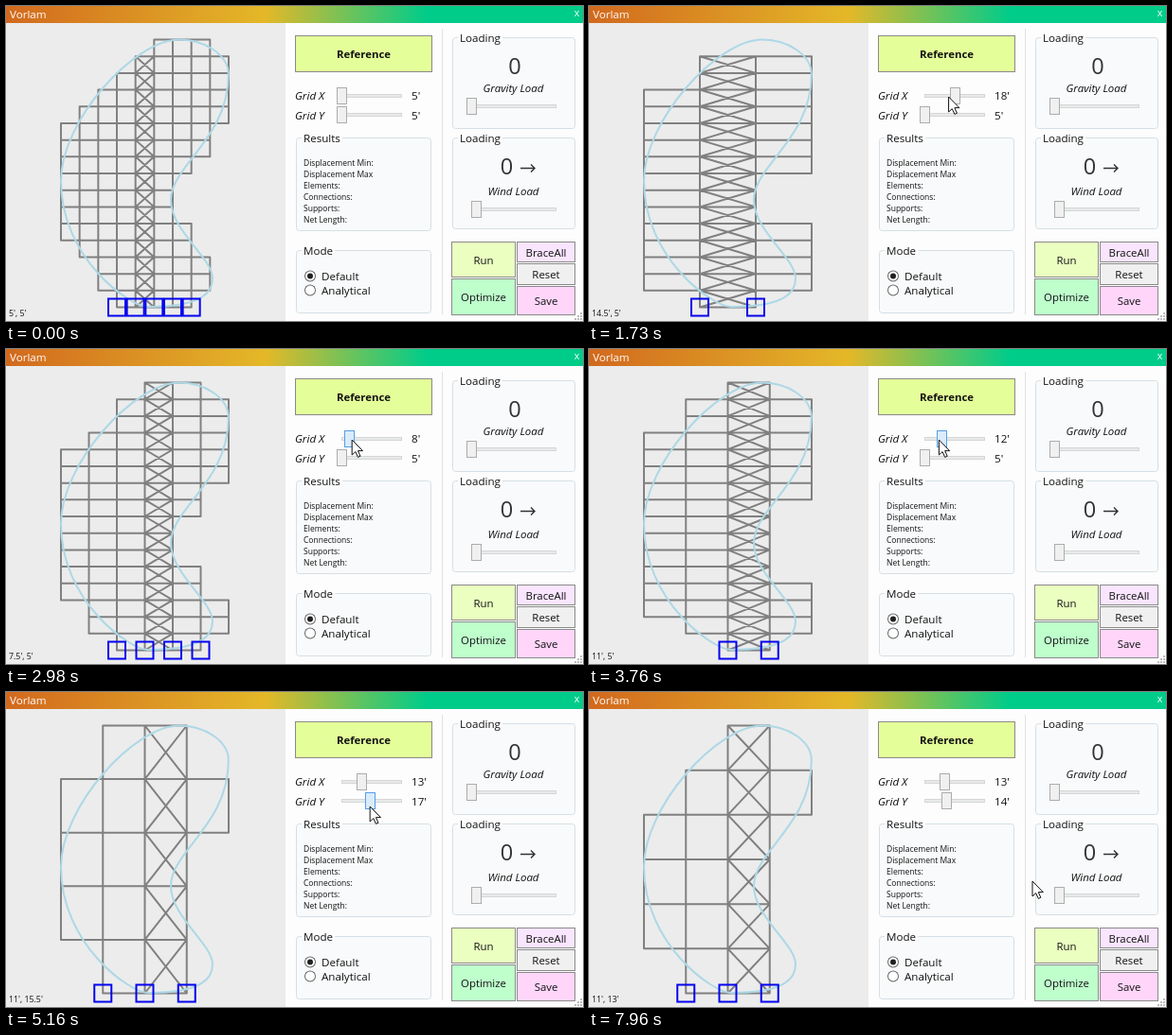
Animation, 609 px wide and 333 px high, one loop 8000 ms. Source, as an HTML page with a canvas:

```html
<!DOCTYPE html>
<html lang="en">
<head>
<meta charset="utf-8">
<title>Vorlam</title>
<style>
html, body { margin: 0; width: 100%; height: 100%; overflow: hidden; background: #fdfdfd; }
canvas { display: block; }
</style>
</head>
<body>
<canvas id="stage" width="609" height="333"></canvas>
<script>
const ctx = document.getElementById('stage').getContext('2d');
const LOOP = 8000;
const SANS = '"Open Sans", "Noto Sans", sans-serif';
const BOX = { x: 58, y: 35.5, w: 177, h: 283, feetX: 44, feetY: 78 };
const ROW_X = 95, ROW_Y = 115;

// Bean shape: one curve between each pair of extreme points.
const outline = new Path2D(`M58 185 C58 121 135.5 35.5 183 35.5 C210 35.5 234.8 52 234.8 72
  C234.8 141 174 168 174 205 C174 238 218 266 218 288 C218 301 210 318 150 318 C131 318 58 267 58 185Z`);

const mix = (a, b, k) => a + (b - a) * k;

function easeOut(t, start, end) {
  const u = Math.min(1, Math.max(0, (t - start) / (end - start)));
  return 1 - (1 - u) ** 2;
}

function gridX(t) {
  const up = mix(5, 20, easeOut(t, 1200, 2050));
  const down = mix(up, 7.4, easeOut(t, 2250, 3210));
  return mix(down, 13.4, easeOut(t, 3210, 4220));
}

function gridY(t) {
  return mix(mix(5, 20.5, easeOut(t, 4600, 5660)), 14.2, easeOut(t, 5660, 6490));
}

const thumbAt = feet => 354 + (feet - 5) * 2.5;

// The pointer comes in, drags X (trailing its thumb), drags Y, then leaves.
function pointer(t) {
  let x = 527, y = 308;
  const go = (toX, toY, start, end) => {
    const k = easeOut(t, start, end);
    x = mix(x, toX, k);
    y = mix(y, toY, k);
  };
  go(thumbAt(gridX(t - 160)), 96, 110, 950);
  go(thumbAt(gridY(t)), 121, 4220, 4520);
  go(468, 200, 7440, 7960);
  return { x, y };
}

function text(str, x, y, size = 11.6, { style = '', align = 'left', color = '#111' } = {}) {
  ctx.font = `${style} ${size}px ${SANS}`;
  ctx.textAlign = align;
  ctx.fillStyle = color;
  ctx.fillText(str, x, y);
}

function box(x, y, w, h, fill, stroke) {
  ctx.fillStyle = fill;
  ctx.fillRect(x, y, w, h);
  ctx.lineWidth = 1;
  ctx.strokeStyle = stroke;
  ctx.strokeRect(x + 0.5, y + 0.5, w - 1, h - 1);
}

function button(label, x, y, w, h, fill, style) {
  box(x, y, w, h, fill, '#8a8a8a');
  text(label, x + w / 2, y + h / 2 + 4.5, 11.4, { align: 'center', style });
}

function group(label, x, y, w, h) {
  ctx.beginPath();
  ctx.roundRect(x + 0.5, y + 0.5, w - 1, h - 1, 3);
  ctx.fillStyle = '#f9fafb';
  ctx.fill();
  ctx.lineWidth = 1;
  ctx.strokeStyle = '#d5dfe5';
  ctx.stroke();
  ctx.font = `11.6px ${SANS}`;
  ctx.fillStyle = '#fdfdfd';
  ctx.fillRect(x + 6, y - 2, ctx.measureText(label).width + 4, 5);
  text(label, x + 8, y + 4.5);
}

function slider(left, right, y, thumb, hot = false) {
  box(left, y - 2, right - left, 4, '#e7eaea', '#d6d6d6');
  box(Math.round(thumb) - 5, y - 9, 11, 18, hot ? '#daecfc' : '#f0f0f0', hot ? '#569de5' : '#acacac');
}

function disc(x, y, r, fill) {
  ctx.beginPath();
  ctx.arc(x, y, r, 0, 7);
  ctx.fillStyle = fill;
  ctx.fill();
}

function radio(label, y, on) {
  disc(321, y, 6, '#666');
  disc(321, y, 5, '#fff');
  if (on) disc(321, y, 3, '#212121');
  text(label, 333, y + 4);
}

function drawFrame(stepX, stepY) {
  const cols = Math.ceil(BOX.feetX / stepX), rows = Math.ceil(BOX.feetY / stepY);
  const px = c => BOX.x + BOX.w * c / cols, py = r => BOX.y + BOX.h * r / rows;
  const inside = (c, r) => ctx.isPointInPath(outline, px(c), py(r));
  const spine = Math.floor(cols / 2), feet = new Set();

  // A cell belongs to the frame when two or more of its corners lie within the outline.
  ctx.beginPath();
  for (let r = 0; r < rows; r++) {
    for (let c = 0; c < cols; c++) {
      const hits = inside(c, r) + inside(c + 1, r) + inside(c, r + 1) + inside(c + 1, r + 1);
      if (hits < 2) continue;
      const [x0, y0, x1, y1] = [px(c), py(r), px(c + 1), py(r + 1)];
      ctx.rect(x0, y0, x1 - x0, y1 - y0);
      if (c === spine) {
        ctx.moveTo(x0, y0); ctx.lineTo(x1, y1);
        ctx.moveTo(x1, y0); ctx.lineTo(x0, y1);
      }
      if (r === rows - 1) feet.add(c).add(c + 1);
    }
  }
  ctx.lineWidth = 2;
  ctx.lineJoin = 'round';
  ctx.strokeStyle = '#808080';
  ctx.stroke();

  ctx.strokeStyle = '#add8e6';
  ctx.stroke(outline);

  ctx.lineJoin = 'miter';
  ctx.strokeStyle = '#0404ee';
  for (const c of feet) ctx.strokeRect(px(c) - 9, BOX.y + BOX.h - 9, 18, 18);

  const half = v => Math.round(v * 2) / 2 + "'";
  text(`${half(BOX.feetX / cols)}, ${half(BOX.feetY / rows)}`, 3, 328, 8.8);
}

function drawPointer({ x, y }) {
  ctx.save();
  ctx.translate(x, y);
  const arrow = new Path2D('M0 0V16L3.7 12.6L6.3 18.4L8.8 17.3L6.3 11.6H11.3Z');
  ctx.fillStyle = '#fff';
  ctx.fill(arrow);
  ctx.lineWidth = 1;
  ctx.strokeStyle = '#111';
  ctx.stroke(arrow);
  ctx.restore();
}

function drawWindow() {
  ctx.fillStyle = '#fdfdfd';
  ctx.fillRect(0, 0, 609, 333);
  ctx.fillStyle = '#ececec';
  ctx.fillRect(0, 18, 295, 315);
  const bar = ctx.createLinearGradient(0, 0, 609, 0);
  bar.addColorStop(0, '#d2691e');
  bar.addColorStop(0.45, '#e4b828');
  bar.addColorStop(0.73, '#00cc8a');
  ctx.fillStyle = bar;
  ctx.fillRect(0, 0, 609, 18);
  text('Vorlam', 4, 13, 11.6, { color: '#fff' });
  text('x', 602.5, 11, 10.5, { color: '#fff', align: 'center' });
  ctx.fillStyle = '#e2e2e2';
  ctx.fillRect(460, 24, 1, 302);
  ctx.fillStyle = '#bbb';
  for (let i = 0; i < 3; i++) for (let j = 0; j <= i; j++) ctx.fillRect(606 - j * 3, 324 + i * 3, 2, 2);
}

function loadPanel(y, caption, reading, readingX, trackX) {
  group('Loading', 471, y, 130, 97);
  text(reading, readingX, y + 39, 23.5, { align: 'center', color: '#333' });
  text(caption, 535.5, y + 58 + (y > 100 ? 3 : 0), 11.5, { align: 'center', style: 'italic' });
  slider(trackX, 581, y + 73 + (y > 100 ? 3 : 0), trackX + 5);
}

function drawControls(x, y, cursor) {
  const over = (thumb, row) => Math.abs(cursor.x - thumb) < 5 && Math.abs(cursor.y - row) < 9;
  button('Reference', 305, 31, 145, 39, '#e4ff99', 'bold');
  [['Grid X', x, ROW_X, 99], ['Grid Y', y, ROW_Y, 120]].forEach(([label, feet, row, base]) => {
    text(label, 305, base, 11.6, { style: 'italic' });
    slider(354, 418, row, thumbAt(feet), over(thumbAt(feet), row));
    text(Math.round(feet) + "'", 428, base);
  });

  group('Results', 306, 139, 143, 99);
  ['Displacement Min:', 'Displacement Max', 'Elements:', 'Connections:', 'Supports:', 'Net Length:']
    .forEach((label, i) => text(label, 314, 169 + i * 12, 8.5));
  group('Mode', 306, 258, 143, 67);
  radio('Default', 285.5, true);
  radio('Analytical', 300.5, false);

  loadPanel(33, 'Gravity Load', '0', 537, 486);
  loadPanel(139, 'Wind Load', '0', 528.5, 491);
  ctx.lineWidth = 1.4;
  ctx.strokeStyle = '#333';
  ctx.stroke(new Path2D('M543 171.5H558M554 167.5L558 171.5L554 175.5'));

  button('Run', 470, 249, 68, 38, '#eaffc0');
  button('Optimize', 470, 288, 68, 39, '#beffcc');
  button('BraceAll', 539, 249, 62, 22, '#fae5ff');
  button('Reset', 539, 272, 62, 23, '#f0f0f0');
  button('Save', 539, 296, 62, 31, '#ffd6fa');
}

function render(now) {
  const t = now % LOOP;
  const x = gridX(t), y = gridY(t), cursor = pointer(t);
  drawWindow();
  drawFrame(Math.round(x), Math.round(y));
  drawControls(x, y, cursor);
  if (t >= 110) drawPointer(cursor);
  requestAnimationFrame(render);
}
requestAnimationFrame(render);
</script>
</body>
</html>
```
